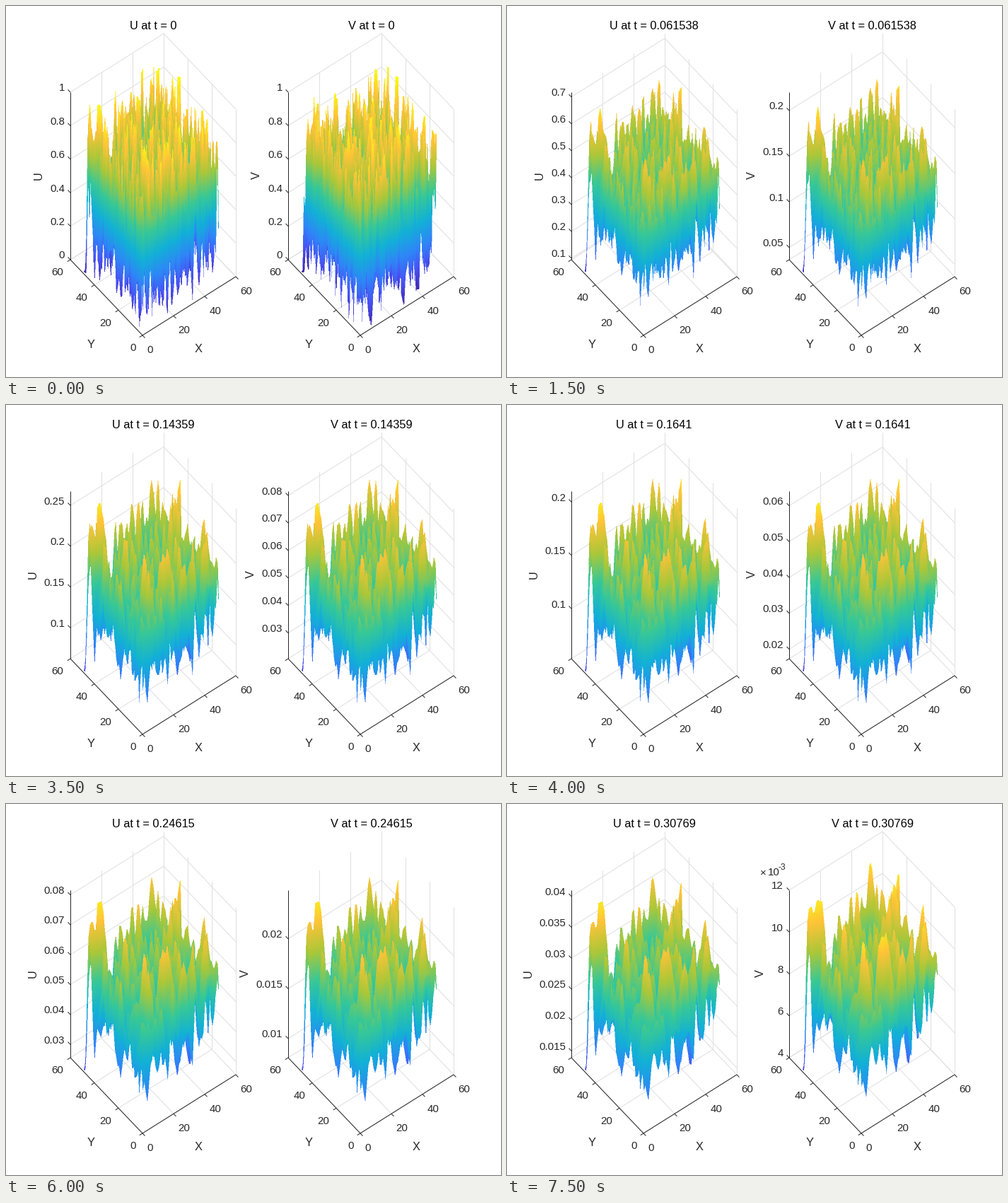
Recreate the animation shown at these times as a matplotlib script. Size 700 by 525 pixels, loop 8000 ms.

```python
import numpy as np
import matplotlib.pyplot as plt
from matplotlib.animation import FuncAnimation
from matplotlib.collections import LineCollection
from matplotlib.colors import LinearSegmentedColormap

plt.rcParams["font.family"] = "Liberation Sans"
W, H, DPI = 700, 525, 100
FRAMES, N = 16, 50
INK, GRID = (.15, .15, .15), (.873, .873, .873)
SHIFT = 308                      # distance between the two panels
OX, OY, ZH = 193, 466, 237       # near floor corner, height of the box
XV = np.array([132, -83]) / 60   # screen step per unit of x
YV = np.array([-102, -107]) / 60
LEFT, RIGHT, TOP, BOTTOM = 110, 301, 55, 485
PARULA = LinearSegmentedColormap.from_list(
    "parula", "#3e26a8 #4852f4 #2e87f7 #12b1d6 "
    "#37c897 #abc739 #fec338 #f9fb15".split(), 512)


# --- z axis ---
def tick_step(span):
    mag = 10.0 ** np.floor(np.log10(span) + 1e-6)
    m = span / mag
    return mag * (.2 if m < 1.5 else .5 if m < 4 else 1 if m < 7 else 2)


def limits(name, k):
    """Lowest and highest z, and whether the axis needs a power of ten."""
    if k == 0:
        return 0.0, 1.0, False
    hi = min(1, np.exp(.43 - .257 * k + .001025 * k * k))
    share = .0362 + .03486 * k - .000978 * k * k
    if name == "V":
        hi *= .305 * (1 + 2.3 * np.exp(-2 * k))
        share += .05 * np.exp(-k / 8)
    lo = hi * share
    small = hi - lo < .01
    if small:
        step = tick_step(hi - lo)
        lo, hi = round(lo / step) * step, round(hi / step) * step
    return lo, hi, small


def ticks(lo, hi):
    step = tick_step(hi - lo)
    first, last = np.ceil(lo / step - 1e-3), np.floor(hi / step + 1e-3)
    return (np.arange(first, last + 1) + 0.0) * step


# --- fields: random start, then diffusion with closed edges ---
rng = np.random.default_rng(11)


def noise():
    f = rng.random((N, N))
    f[:2, -2:] = .02
    f[43:45, 43:45] = f[48:, 32:34] = .95
    return f


START = {"U": noise(), "V": noise()}
MODE = np.arange(N)
COS = np.cos(np.pi * MODE[:, None] * (MODE + .5) / N) * np.sqrt(2 / N)
COS[0] /= np.sqrt(2)
FREQ = (np.pi * MODE / N) ** 2


def field(name, k):
    """Surface height as a share of the z axis."""
    # V quickly takes on the form of U
    f = START["U"] + (name == "V") * .3 ** k * (START["V"] - START["U"])
    damp = np.exp(-(.1 + .075 * k) / 2 * (FREQ[:, None] + FREQ))
    f = COS.T @ (COS @ f @ COS.T * damp) @ COS
    spread = .17 * (1 - .006 * k) + .1 * np.exp(-3 * k)
    h = .53 - .03 * np.exp(-k) + spread * (f - f.mean()) / f.std()
    if limits(name, k)[2]:
        h *= 1.1                 # rounded limits sit closer to the data
    return np.clip(h, 0, 1)


# --- one floor line per half pixel column, sampled front to back ---
u = (np.arange((RIGHT - LEFT) * 2) + .5) / 2 + LEFT - OX
a, b, c, d = XV[0], YV[0], -XV[1], -YV[1]
det = a * d - b * c
near = np.maximum((det - d * u) / -b, (det + c * u) / a)
far = np.minimum((N * det - d * u) / -b, (N * det + c * u) / a)
depth = near[:, None] + (far - near)[:, None] * np.linspace(0, 1, 120)
gx = np.clip((d * u[:, None] - b * depth) / det - 1, 0, N - 1)
gy = np.clip((a * depth - c * u[:, None]) / det - 1, 0, N - 1)
ix, iy = np.minimum(gx.astype(int), N - 2), np.minimum(gy.astype(int), N - 2)
fx, fy = gx - ix, gy - iy
rows = np.arange(TOP, BOTTOM) + .5


def render(name, k):
    """Ray cast the height field into an RGBA picture."""
    f = field(name, k)
    h = ((f[ix, iy] * (1 - fx) + f[ix + 1, iy] * fx) * (1 - fy)
         + (f[ix, iy + 1] * (1 - fx) + f[ix + 1, iy + 1] * fx) * fy)
    below = (OY - depth - ZH * h)[:, :, None] > rows
    hit = below[:, 1:] != below[:, :-1]
    hit[:-1] |= below[1:, 1:] != below[:-1, 1:]   # steep sides
    first = hit.argmax(axis=1)
    seen = hit.any(axis=1)
    z = (OY - np.take_along_axis(depth, first, 1) - rows) / ZH
    shade = z + (1 - np.exp(-k / 3)) * (.1 - .16 * z)
    rgb = PARULA(np.clip(shade, 0, 1))[..., :3] * seen[..., None]
    count = seen.reshape(-1, 2, len(rows)).sum(axis=1)
    rgb = rgb.reshape(-1, 2, len(rows), 3).sum(axis=1)
    rgb = rgb / np.maximum(count, 1)[..., None]
    rgba = np.concatenate([rgb, count[..., None] / 2], axis=2)
    return np.clip(rgba.transpose(1, 0, 2), 0, 1)


# --- stage ---
fig = plt.figure(figsize=(W / DPI, H / DPI), dpi=DPI, facecolor="white")
ax = fig.add_axes([0, 0, 1, 1])
ax.set_xlim(0, W)
ax.set_ylim(H, 0)
ax.axis("off")
ax.set_autoscale_on(False)


def point(x, y, z=0, off=0):
    p = np.array([OX + off, OY]) + x * XV + y * YV
    return p[0], p[1] - ZH * z


def label(x, y, s, size=15, ha="center", color=INK):
    """Text whose digits are centred on y."""
    return ax.text(x, y + .36 * size, s, fontsize=size * .72, ha=ha,
                   va="baseline", color=color, zorder=4)


def lines(segs, color, z):
    return ax.add_collection(
        LineCollection(segs, colors=[color], linewidths=.72, zorder=z),
        autolim=False)


def tick(p, v, size=5):
    return [p, tuple(np.array(p) + size * np.array(v) / np.hypot(*v))]


def frame_box(off):
    grid, axes = [], []
    for t in (0, 20, 40, 60):
        grid += [[point(t, 0, 0, off), point(t, 60, 0, off)],
                 [point(0, t, 0, off), point(60, t, 0, off)],
                 [point(t, 60, 0, off), point(t, 60, 1, off)],
                 [point(60, t, 0, off), point(60, t, 1, off)]]
        px, py = point(t, 0, 0, off), point(0, t, 0, off)
        axes += [tick(px, -YV), tick(py, -XV)]
        label(px[0] + 6.5, px[1] + 19.5, str(t), ha="left")
        label(py[0] - 9.5, py[1] + 17, str(t), ha="right")
    corner, side = point(0, 0, 0, off), point(0, 60, 0, off)
    axes += [[corner, point(60, 0, 0, off)], [corner, side],
             [side, point(0, 60, 1, off)]]
    lines(grid, GRID, 1)
    lines(axes, INK, 3)
    label(272 + off, 484, "X", 16.4)
    label(120 + off, 478, "Y", 16.4)


def panel(name, k, off):
    lo, hi, small = limits(name, k)
    grid, marks, names, out = [], [], [], []
    for v in ticks(lo, hi):
        z = (v - lo) / (hi - lo)
        p, back = point(0, 60, z, off), point(60, 60, z, off)
        grid += [[p, back], [back, point(60, 0, z, off)]]
        marks.append(tick(p, YV))
        names.append(f"{round(v * (1000 if small else 1), 6):g}")
        out.append(label(p[0] - 8, p[1] - 7, names[-1], ha="right"))
    out += [lines(grid, GRID, 1), lines(marks, INK, 3)]
    if small:
        out += [label(54 + off, 96, "×"), label(69 + off, 96, "10"),
                label(81 + off, 89, "-3", 12)]
    chars = max(map(len, names))
    x = 50 if chars < 3 else 46 - 8 * (chars - 3)
    out.append(ax.text(x + off, 240, name, rotation=90, ha="center",
                       va="center", fontsize=16.4 * .72, color=INK))
    out.append(label(208 + off * 1.003, 27.5,
                     f"{name} at t = {k * .8 / 39:.5g}", 16.4, color="black"))
    out.append(ax.imshow(
        render(name, k), interpolation="nearest", aspect="auto", zorder=2,
        extent=(LEFT + off, RIGHT + off, BOTTOM, TOP)))
    return out


for off in (0, SHIFT):
    frame_box(off)
moving = []


def draw(k):
    while moving:
        moving.pop().remove()
    moving.extend(panel("U", k, 0) + panel("V", k, SHIFT))
    ax.set_xlim(0, W)
    ax.set_ylim(H, 0)
    return moving


anim = FuncAnimation(fig, draw, frames=FRAMES, interval=500, repeat=True,
                     repeat_delay=0, blit=False)
plt.show()
```
